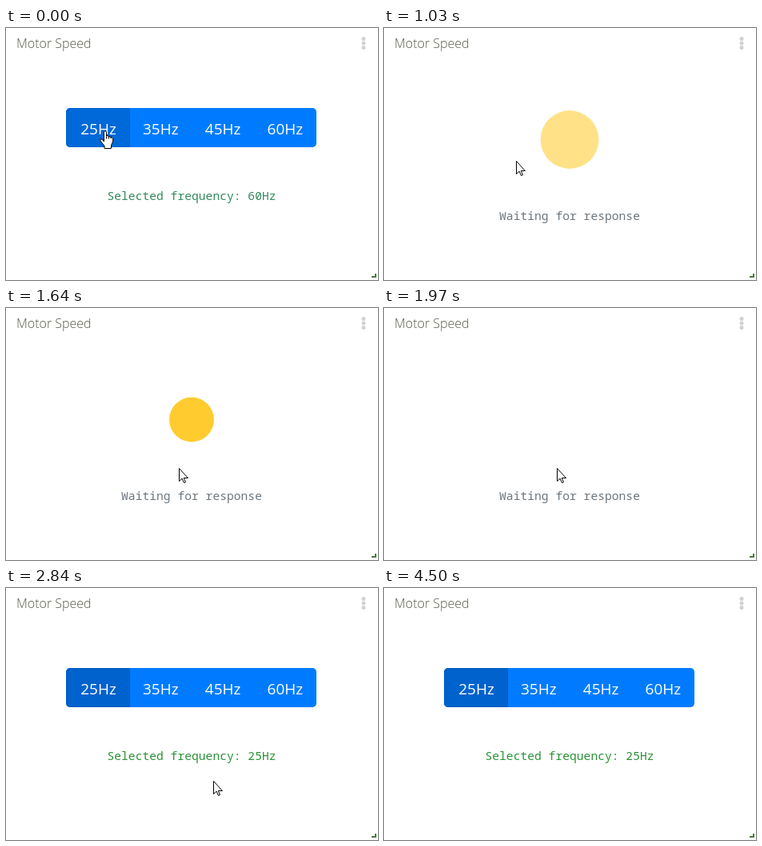
An HTML page with a canvas that plays this animation: 465x315 px, repeating every 4730 ms.

```html
<!DOCTYPE html>
<html lang="en">
<head>
<meta charset="utf-8">
<title>Motor Speed</title>
<style>
  html, body { margin: 0; width: 100%; height: 100%; overflow: hidden; background: #fff; }
  canvas { display: block; }
</style>
</head>
<body>
<canvas id="stage" width="465" height="315"></canvas>
<script>
const ctx = document.getElementById('stage').getContext('2d');
const LOOP = 4730;
const CLICK = 230, WAIT = 470, DONE = 2690;
const SPIN_PERIOD = 740;
const MONO = '14.66px "Noto Sans Mono", monospace';

// Pointer legs: each travels from the previous rest point
const REST = { x: 123, y: 129 };
const LEGS = [
  { from: 650, to: 1030, x: 165, y: 166 },
  { from: 1030, to: 1300, x: 216, y: 200 },
  { from: 2080, to: 2300, x: 235, y: 206 },
  { from: 2570, to: 2820, x: 259, y: 241 },
  { from: 3760, to: 4310, x: 280, y: 316 }
];

const clamp = v => Math.max(0, Math.min(1, v));

function pointerAt(t) {
  let { x, y } = REST;
  for (const leg of LEGS) {
    const k = clamp((t - leg.from) / (leg.to - leg.from));
    x += (leg.x - x) * k;
    y += (leg.y - y) * k;
  }
  return [Math.round(x), Math.round(y)];
}

function text(str, x, y, font, color, align = 'center') {
  ctx.font = font;
  ctx.fillStyle = color;
  ctx.textAlign = align;
  ctx.fillText(str, x, y);
}

function disc(x, y, r, color) {
  ctx.fillStyle = color;
  ctx.beginPath();
  ctx.arc(x, y, r, 0, Math.PI * 2);
  ctx.fill();
}

function outline() {
  ctx.fillStyle = '#fff';
  ctx.strokeStyle = '#000';
  ctx.lineWidth = 1;
  ctx.fill();
  ctx.stroke();
}

function drawCard() {
  ctx.fillStyle = '#fff';
  ctx.fillRect(0, 0, 465, 315);
  text('Motor Speed', 13, 25, '300 16px "Open Sans", sans-serif', '#555a48', 'left');
  for (let i = 0; i < 3; i++) disc(447, 13.5 + i * 5.5, 2.5, '#d2d2d2');
  ctx.fillStyle = '#4b7a3c';
  ctx.fillRect(461, 307, 2, 5);
  ctx.fillRect(457, 310, 6, 2);
}

function drawButtons(t) {
  const x = 75, y = 100, w = 80, h = 49, r = 5;
  const clicked = t >= CLICK;

  if (clicked && t < WAIT) {
    const s = 3.2 * clamp((t - CLICK + 30) / 150);
    ctx.fillStyle = 'rgba(0,123,255,.5)';
    ctx.beginPath();
    ctx.roundRect(x - s, y - s, w + 2 * s, h + 2 * s, [r + s, 0, 0, r + s]);
    ctx.roundRect(x, y, w, h, [r, 0, 0, r]);
    ctx.fill('evenodd');
  }

  ctx.fillStyle = '#007bff';
  ctx.beginPath();
  ctx.roundRect(x, y, 313, h, r);
  ctx.fill();

  ctx.fillStyle = clicked ? '#0062cc' : '#0069d9';
  ctx.strokeStyle = clicked ? '#005cbf' : '#0062cc';
  ctx.lineWidth = 1;
  ctx.beginPath();
  ctx.roundRect(x + .5, y + .5, w - 1, h - 1, [r - .5, 0, 0, r - .5]);
  ctx.fill();
  ctx.stroke();

  [25, 35, 45, 60].forEach((hz, i) =>
    text(hz + 'Hz', 115.5 + 77.8 * i, 133, '500 19px "Open Sans", sans-serif', '#fff'));
}

// Grows from nothing while fading in, then out
function drawSpinner(t) {
  const p = (t - WAIT) / SPIN_PERIOD % 1;
  ctx.globalAlpha = 1 - Math.abs(2 * p - 1);
  disc(232, 139.5, 48 * p, '#ffc107');
  ctx.globalAlpha = 1;
}

function drawArrow(x, y) {
  ctx.save();
  ctx.translate(x + .5, y + .5);
  ctx.stroke(new Path2D());
  const shape = new Path2D('M0 0V16L3.6 12.6L6 18L8 17.2L5.8 12H11Z');
  ctx.fillStyle = '#fff';
  ctx.strokeStyle = '#000';
  ctx.lineWidth = 1;
  ctx.fill(shape);
  ctx.stroke(shape);
  ctx.restore();
}

function drawHand(x, y) {
  const knuckles = [11.5, 14.2, 16.7];
  ctx.save();
  ctx.translate(x - 6, y - 1);
  ctx.beginPath();
  ctx.moveTo(5.5, 14);
  ctx.lineTo(5.5, 2);
  ctx.quadraticCurveTo(7, -1, 8.5, 2);
  ctx.lineTo(8.5, 7);
  knuckles.forEach((right, i) =>
    ctx.quadraticCurveTo(right - 1.2, 5.5 + i, right, 8 + i));
  ctx.lineTo(16.7, 14);
  ctx.lineTo(14.5, 18.5);
  ctx.lineTo(14.5, 22.5);
  ctx.lineTo(6, 22.5);
  ctx.lineTo(6, 19.5);
  ctx.lineTo(.8, 12.8);
  ctx.quadraticCurveTo(.5, 10, 3, 11);
  ctx.closePath();
  outline();
  ctx.beginPath();
  for (const fx of [8.5, 11.5, 14.2]) {
    ctx.moveTo(fx, 7.5);
    ctx.lineTo(fx, 10.5);
  }
  ctx.stroke();
  ctx.restore();
}

function draw(t) {
  drawCard();
  const done = t >= DONE;
  if (t >= WAIT && !done) {
    drawSpinner(t);
    text('Waiting for response', 232, 240, MONO, '#6c757d');
  } else {
    drawButtons(t);
    text(`Selected frequency: ${done ? 25 : 60}Hz`, 232, 215, MONO,
      done ? '#2a9236' : '#338a5c');
  }
  const drawPointer = t < WAIT ? drawHand : drawArrow;
  drawPointer(...pointerAt(t));
}

function tick() {
  draw(performance.now() % LOOP);
  requestAnimationFrame(tick);
}
tick();
</script>
</body>
</html>
```
